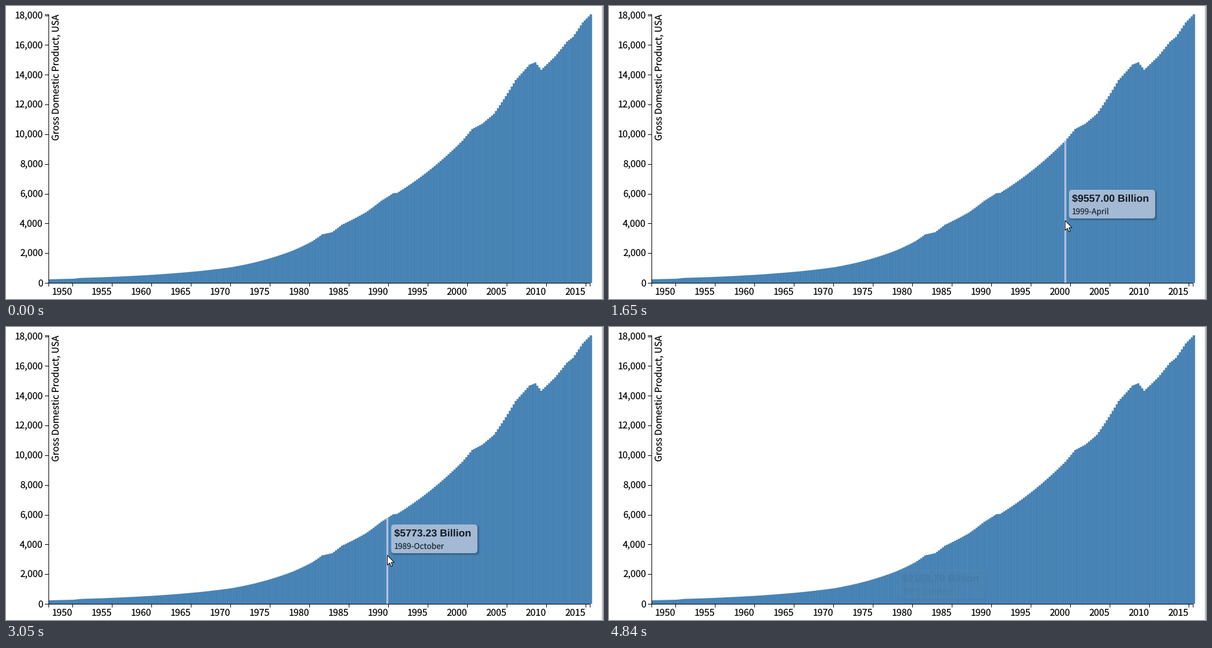
Animation of 998 by 491 pixels, one loop 5.79 s. Source, as a matplotlib script:

```python
import numpy as np
import matplotlib.pyplot as plt
from matplotlib.animation import FuncAnimation
from matplotlib.patches import FancyBboxPatch, Polygon, Rectangle

plt.rcParams["text.hinting"] = "none"

W, H, DPI = 998, 491, 64
PT = 72 / DPI                    # points per pixel
LEFT, BASE, STEP, BAR = 71.5, 464, 3.3, 4
STEP_MS, LOOP_MS = 30, 5790
SANS = "Noto Sans CJK JP"
BLUE = "#4682b4"

# Turning points of the curve; growth between them is exponential
TURNS = [
    (1947, 243), (1950, 281), (1951, 336), (1954, 386), (1960, 543),
    (1966, 797), (1970, 1053), (1973, 1381), (1977.75, 2168.7),
    (1980.25, 2800), (1981.5, 3261.2), (1982.75, 3408), (1984, 3913),
    (1987, 4736), (1989, 5527.4), (1990.5, 6030), (1991, 6055),
    (1994, 7136.3), (1999.25, 9557), (2000.5, 10357.4), (2001.75, 10701),
    (2003.25, 11371), (2006, 13649), (2007.75, 14685), (2008.5, 14843),
    (2009.25, 14340), (2011, 15238), (2012.5, 16228), (2013.25, 16541),
    (2014.5, 17522), (2015.5, 18065)]
years, values = np.transpose(TURNS)
gdp = np.exp(np.interp(1947 + np.arange(275) / 4, years, np.log(values)))


def y_of(value):
    return BASE - value * 450 / gdp[-1]


tops = y_of(gdp)
edges = LEFT + STEP * np.arange(275)

# The screen repaints in bursts: start time and number of repaints
BURSTS = [(880, 6), (1650, 2), (2120, 2), (2580, 3),
          (2980, 2), (3540, 2), (3830, 2), (4390, 7)]
PAINTS = [start + 74 * k for start, count in BURSTS for k in range(count)]
ENTER, EXIT = BURSTS[0][0], BURSTS[-1][0]

# Pointer path: repaint number, hovered quarter, height
PATH = np.transpose([
    (0, 222, 456), (3, 214, 361), (5, 214, 366), (6, 209, 359),
    (10, 188, 368), (12, 174, 378), (14, 168, 386), (17, 138, 414),
    (18, 126, 426), (19, 123, 458)])

fig = plt.figure(figsize=(W / DPI, H / DPI), dpi=DPI, facecolor="white")
ax = fig.add_axes([0, 0, 1, 1])
ax.axis("off")


def block(x, y, w, h, color="black", z=3):
    return ax.add_patch(Rectangle((x, y), w, h, fc=color, lw=0, zorder=z))


def label(x, y, text, px=15.5, family=SANS, **kw):
    return ax.text(x, y, text, fontsize=px * PT, family=family,
                   va="baseline", **kw)


def draw_chart():
    sides = np.append(edges, edges[-1] + BAR)
    ax.fill(np.repeat(sides, 2), np.r_[BASE, np.repeat(tops, 2), BASE],
            color=BLUE, lw=0, snap=False, zorder=1)
    frac = edges[1:] % 1
    seams = np.ones((len(frac), 4))
    seams[:, 3] = 0.25 * frac * (1 - frac)
    ax.vlines(edges[1:], np.maximum(tops[:-1], tops[1:]), BASE,
              colors=seams, lw=PT, zorder=1.5)

    block(71, 14, 1, 451)
    block(65, 14, 6, 1)
    for v in range(0, 18001, 2000):
        y = y_of(v)
        block(65, round(y), 6, 1)
        label(62, y + 5.3, f"{v:,}", ha="right")

    block(71, BASE, 906, 1)
    for x in (71, 976):
        block(x, BASE, 1, 6)
    for year in range(1950, 2016, 5):
        x = LEFT + (year - 1947) * 4 * STEP
        block(int(x), BASE, 1, 6)
        label(x, 484, str(year), ha="right")

    label(89, 14, "Gross Domestic Product, USA", ha="right",
          rotation=90, rotation_mode="anchor")
    block(996, 0, 2, H, "#c4c4c4")


def rounded(color, z):
    return ax.add_patch(FancyBboxPatch(
        (0, 0), 10, 10, boxstyle="round,pad=0,rounding_size=5",
        fc=color, lw=0, zorder=z))


draw_chart()
hover = block(0, 0, STEP, 1, "#b2bfdd", 4)
hover.set_snap(False)
shadows = [rounded("black", 5) for _ in range(4)]
tip = rounded("#b0c4de", 6)
amount = label(0, 0, "", 17.1, "Liberation Sans", weight="bold",
               color="#0c1218", zorder=7)
date = label(0, 0, "", 13.2, color="#16202a", zorder=7)
ARROW = np.array([(0, 0), (0, 16.5), (3.8, 13), (6.3, 18.7), (8.8, 17.6),
                  (6.4, 12), (11.5, 12)])
pointer = ax.add_patch(Polygon(ARROW, fc="white", ec="black", lw=PT,
                               joinstyle="miter", zorder=8))
ax.set_xlim(0, W)
ax.set_ylim(H, 0)


def ease(t):
    t = min(max(t, 0), 1)
    return 4 * t ** 3 if t < 0.5 else 1 - 4 * (1 - t) ** 3


def tip_opacity(t):
    if t >= EXIT:
        return 1 - ease((t - 4360) / 640)
    return ease((t - 1000) / 230)


def place_tip(x, y, quarter, alpha):
    text = f"${gdp[quarter]:.2f} Billion"
    width = 10 * len(text) - 16
    for grow, patch in enumerate(shadows, -1):
        patch.set_bounds(x + 2 - grow, y + 2 - grow,
                         width + 2 * grow, 48 + 2 * grow)
        patch.set_alpha(0.07 * alpha)
    tip.set_bounds(x, y, width, 48)
    tip.set_alpha(0.9 * alpha)
    month = ("January", "April", "July", "October")[quarter % 4]
    amount.set_text(text)
    date.set_text(f"{1947 + quarter // 4}-{month}")
    for item, dy in ((amount, 20), (date, 41)):
        item.set_position((x + 5, y + dy))
        item.set_alpha(0.95 * alpha)


def update(i):
    t = i * STEP_MS + 20
    n = max(int(np.searchsorted(PAINTS, t, side="right")) - 1, 0)
    painted = PAINTS[n] if t >= ENTER else 0
    q, y = (round(float(np.interp(n, PATH[0], row))) for row in PATH[1:])
    inside = ENTER <= painted < EXIT
    alpha = tip_opacity(painted)

    for item in (hover, pointer):
        item.set_visible(inside)
    for item in (*shadows, tip, amount, date):
        item.set_visible(alpha > 0)
    hover.set_bounds(edges[q], tops[q], STEP, BASE - tops[q])
    pointer.set_xy(ARROW + (round(edges[q] + 1) + 0.5, y + 0.5))
    place_tip(round(edges[q] + 7.8), y - 51, q, alpha)
    return hover, pointer, tip, amount, date


anim = FuncAnimation(fig, update, frames=LOOP_MS // STEP_MS,
                     interval=STEP_MS, repeat=True, repeat_delay=0,
                     cache_frame_data=False)
plt.show()
```
